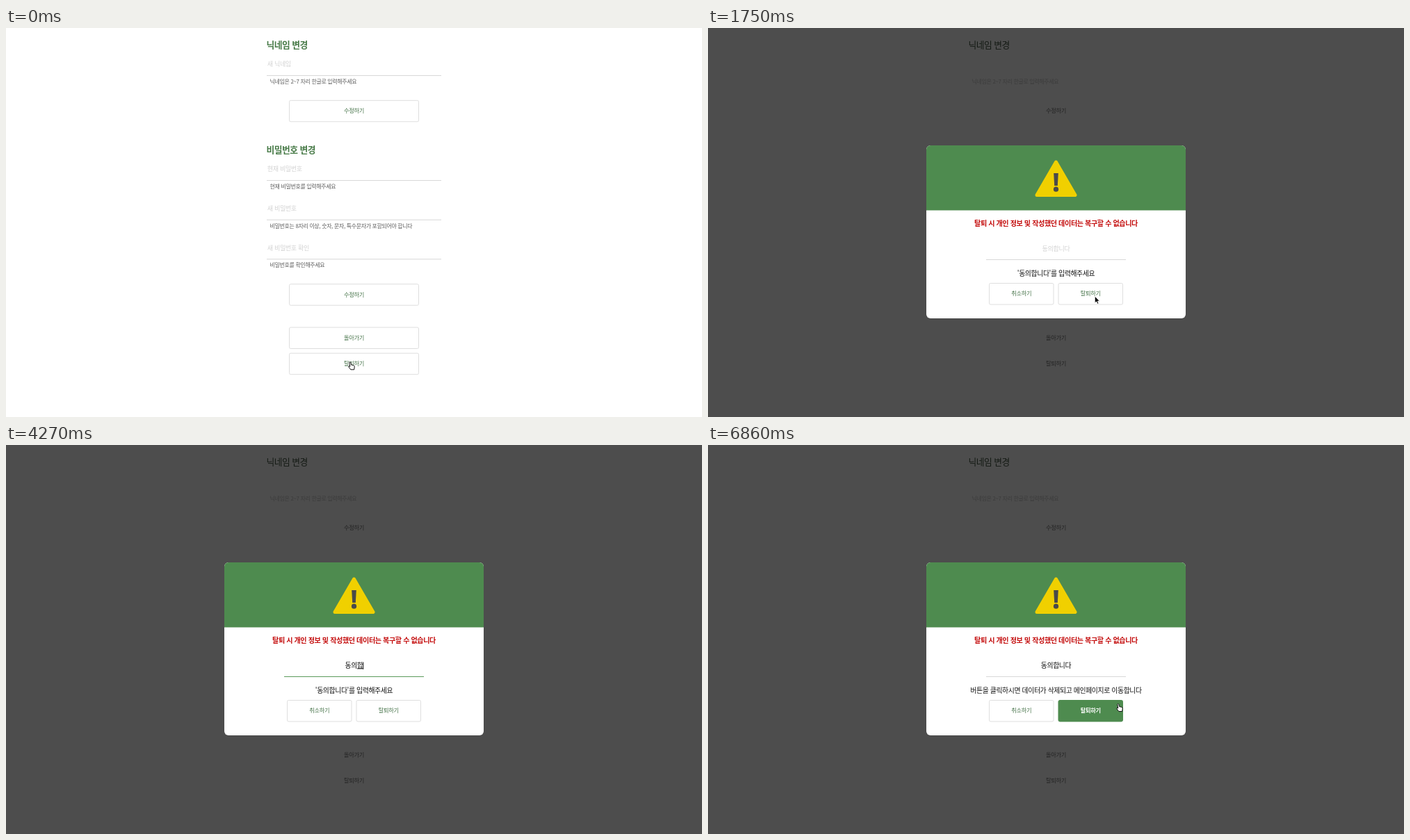
An HTML page for the animation above (7630 ms loop, 1001 by 560 pixels).

```html
<!DOCTYPE html>
<html lang="ko">
<head>
<meta charset="utf-8">
<title>회원 정보 변경</title>
<style>
  html, body { margin: 0; width: 100%; height: 100%; overflow: hidden; background: #fff; }
  svg { display: block; width: 1001px; height: 560px; }
  text {
    font-family: "Noto Sans CJK KR", "Noto Sans KR", "Noto Sans CJK", sans-serif;
    letter-spacing: -.04em;
    white-space: pre;
  }
  .mid { text-anchor: middle; }
  .bg { fill: #fff; }
  .title { font-size: 12.75px; font-weight: 700; fill: #477a47; }
  .hint { font-size: 9.05px; fill: #d2d2d2; }
  .help { font-size: 7.95px; fill: #5c5c5c; }
  .label { font-size: 8.25px; font-weight: 500; fill: #47744a; }
  .line { fill: #d8d8d8; }
  .box { fill: #fff; stroke: #dedede; }
  .warn { font-size: 10.1px; font-weight: 700; fill: #c40d0d; }
  .note, .typed { font-size: 9.9px; font-weight: 500; fill: #111; }

  .dim .bg { fill: #4d4d4d; }
  .dim .page .title { font-weight: 500; fill: #141a14; }
  .dim .page .help { font-weight: 300; fill: #3c3c3c; }
  .dim .page .label { font-weight: 300; fill: #242424; }
  .dim .page :is(.hint, .line, .box) { display: none; }

  .modal { display: none; }
  .dim .modal { display: inline; }
  .focus .modal .line { fill: #5b9a5b; }
  .ready .go .box { fill: #4e8b4f; stroke: #4e8b4f; }
  .ready .go .label { fill: #fff; font-weight: 700; }
</style>
</head>
<body>
<svg id="stage" viewBox="0 0 1001 560">
  <rect class="bg" width="1001" height="560"/>
  <g class="page" id="page"></g>
  <g class="modal" id="modal">
    <rect x="314" y="169" width="373" height="249" rx="6" fill="#fff"/>
    <path d="M314 262.5V175a6 6 0 0 1 6-6H681a6 6 0 0 1 6 6V262.5Z" fill="#4e8b4f"/>
    <path d="M500.5 193L528 240.5H473Z" fill="#f0d000" stroke="#f0d000" stroke-width="5" stroke-linejoin="round"/>
    <path d="M497.2 209H503.8L502.8 227H498.2Z" fill="#4a4a4a"/>
    <circle cx="500.5" cy="232.2" r="3.6" fill="#4a4a4a"/>
  </g>
  <g id="pointer">
    <circle id="ring" r="18.8" fill="none" stroke="#111" stroke-width="1.2"/>
    <path id="arrow" d="M0 0V10L2.3 7.9L3.8 11.3L5.5 10.6L4 7.2H7Z" fill="#000" stroke="#fff" stroke-width=".8"/>
    <path id="hand" d="M-1.2 .5C-1 -.7 .6 -.7 .8 .4L1.5 3.6L4.6 4.2Q6.4 4.6 6.2 6.6L5.7 10.5H.8L-2.2 6.6Q-2.6 5.2 -1 5.6L-.2 6Z" fill="#fff" stroke="#111" stroke-width="1" stroke-linejoin="round"/>
  </g>
</svg>
<script>
const LOOP = 7630, STEP = 70, MID = 500.5;
const SIZE = { title: 12.75, hint: 9.05, help: 7.95, label: 8.25, warn: 10.1, note: 9.9, typed: 9.9 };
const $ = id => document.getElementById(id);
const stage = $('stage'), page = $('page'), modal = $('modal');

function add(parent, tag, attrs, content = '') {
  const el = document.createElementNS('http://www.w3.org/2000/svg', tag);
  for (const key in attrs) el.setAttribute(key, attrs[key]);
  el.textContent = content;
  return parent.appendChild(el);
}

// Text is placed by the vertical centre of its syllables.
const left = (parent, cls, x, cy, s) =>
  add(parent, 'text', { class: cls, x, y: cy + SIZE[cls] * .38 }, s);
const centred = (parent, cls, x, cy, s) =>
  add(parent, 'text', { class: cls + ' mid', x, y: cy + SIZE[cls] * .38 }, s);
const line = (parent, x, y, width) =>
  add(parent, 'rect', { class: 'line', x, y, width, height: 1 });

function button(parent, x, y, width, s) {
  const g = add(parent, 'g', {});
  add(g, 'rect', { class: 'box', x, y, width, height: 30.5, rx: 2 });
  centred(g, 'label', x + width / 2, y + 14.8, s);
  return g;
}

function field(y, hint, help) {
  left(page, 'hint', 375.8, y - 16, hint);
  line(page, 375, y, 251);
  left(page, 'help', 379.6, y + 9, help);
}

left(page, 'title', 374.5, 24.5, '닉네임 변경');
field(68, '새 닉네임', '닉네임은 2~7 자리 한글로 입력해주세요');
button(page, 407.5, 104.3, 186, '수정하기');
left(page, 'title', 374.5, 175.5, '비밀번호 변경');
field(219, '현재 비밀번호', '현재 비밀번호를 입력해주세요');
field(275.7, '새 비밀번호', '비밀번호는 8자리 이상, 숫자, 문자, 특수문자가 포함되어야 합니다');
field(332.3, '새 비밀번호 확인', '비밀번호를 확인해주세요');
button(page, 407.5, 368.7, 186, '수정하기');
button(page, 407.5, 431, 186, '돌아가기');
button(page, 407.5, 468.2, 186, '탈퇴하기');

centred(modal, 'warn', MID, 281.5, '탈퇴 시 개인 정보 및 작성했던 데이터는 복구할 수 없습니다');
const hint = centred(modal, 'hint', MID, 317.7, '동의합니다');
const typed = centred(modal, 'typed', MID, 317.7, '');
const mark = add(modal, 'rect', { y: 321.4, width: 8.6, height: 1, fill: '#111' });
const caret = add(modal, 'rect', { y: 312.5, width: 1, height: 10.5, fill: '#111' });
line(modal, 400, 333, 201);
const note = centred(modal, 'note', MID, 353, '');
button(modal, 404.5, 367.5, 92.5, '취소하기');
button(modal, 504, 367.5, 92.5, '탈퇴하기').setAttribute('class', 'go');

const OPEN = 840, FOCUS = 2100, BLUR = 6300, READY = 4690;
const KEYS = [
  [0, ''], [2450, 'e'], [2940, ''], [3360, 'ㄷ'], [3430, '도'], [3570, '동'],
  [3780, '동ㅇ'], [3920, '동으'], [4060, '동의'], [4200, '동의하'], [4270, '동의합'],
  [4410, '동의합ㄴ'], [4480, '동의합니'], [4620, '동의합니ㄷ'], [READY, '동의합니다']
];
const PATH = [
  [0, 495, 481.3], [420, 495, 481.3], [560, 505, 480.9], [1400, 505, 480.9], [2030, 593, 318],
  [2170, 593, 318], [2380, 768, 300.5], [5670, 768, 300.5], [6020, 700, 372],
  [6230, 671, 349], [6370, 671, 349], [6860, 590, 373], [LOOP, 590, 373]
];
const CLICKS = [[770, 840], [2100, 2240], [6300, 6440]];

const within = (t, a, b) => t >= a && t < b;
const show = (el, on) => { el.style.display = on ? '' : 'none'; };

function pointerAt(t) {
  const i = PATH.findIndex(p => p[0] > t);
  const [t0, x0, y0] = PATH[i - 1], [t1, x1, y1] = PATH[i];
  const u = (t - t0) / (t1 - t0), k = u * u * (3 - 2 * u);
  return [x0 + (x1 - x0) * k, y0 + (y1 - y0) * k];
}

function drawInput(t) {
  const value = KEYS.filter(k => k[0] <= t).pop()[1];
  const focused = within(t, FOCUS, BLUR);
  typed.textContent = value;
  show(hint, !value);
  const end = MID + (value ? typed.getComputedTextLength() / 2 : 0);
  caret.setAttribute('x', end - .3);
  mark.setAttribute('x', end - 8.6);
  show(caret, focused && !within(t, 5250, 5740));
  show(mark, focused && /[ㄱ-힣]$/.test(value));
  note.textContent = t >= READY
    ? '버튼을 클릭하시면 데이터가 삭제되고 메인페이지로 이동합니다'
    : "'동의합니다'를 입력해주세요";
  stage.classList.toggle('focus', focused);
  stage.classList.toggle('ready', t >= READY);
}

function drawPointer(t) {
  const [x, y] = pointerAt(t);
  const hand = t < OPEN || (t > BLUR && x < 597 && y > 367);
  $('pointer').setAttribute('transform', `translate(${x} ${y})`);
  show($('pointer'), !within(t, 2450, 5670));
  show($('hand'), hand);
  show($('arrow'), !hand);
  show($('ring'), CLICKS.some(c => within(t, ...c)));
}

const start = performance.now();
function draw(now) {
  const t = Math.floor(Math.max(0, now - start) % LOOP / STEP) * STEP;
  stage.classList.toggle('dim', t >= OPEN);
  drawInput(t);
  drawPointer(t);
  requestAnimationFrame(draw);
}
draw(start);
</script>
</body>
</html>
```
